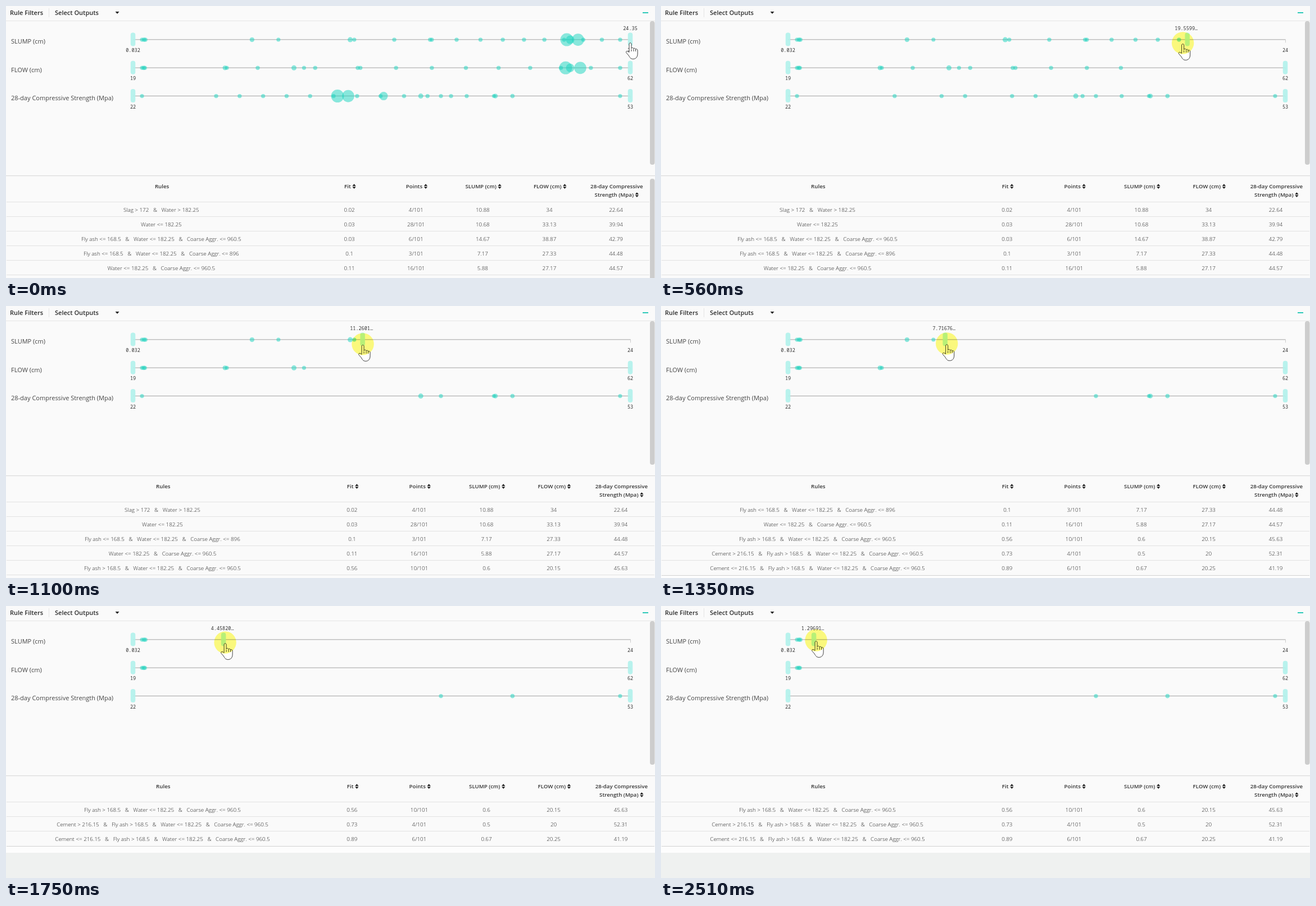
An HTML page with a canvas for the animation above (2690 ms loop, 1155x485 px).

```html
<!DOCTYPE html>
<html lang="en">
<head>
<meta charset="utf-8">
<title>Rule Filters</title>
<style>
html, body { margin: 0; width: 100%; height: 100%; overflow: hidden; background: #fafafa; }
canvas { display: block; }
</style>
</head>
<body>
<canvas id="stage" width="1155" height="485"></canvas>
<script>
const ctx = document.getElementById('stage').getContext('2d');
const W = 1155, H = 485, LOOP = 2690;
const X0 = 226, X1 = 1111, MIN = 0.032, MAX = 24.35;
const SANS = '"Open Sans", "Noto Sans", sans-serif';
const LABEL = '11px ' + SANS;
const TITLE = '600 11px ' + SANS;
const HEAD = '600 9.7px ' + SANS;
const CELL = '300 9.8px ' + SANS;
const MONO = '8.5px "Noto Sans Mono", "DejaVu Sans Mono", monospace';

// Key poses of the drag; a smooth curve runs through them.
const poses = [
  { step: 0, value: 24.35, dx: 0, y: 64 },
  { step: 4, value: 21.2859, dx: -9, y: 65 },
  { step: 7, value: 15.2065, dx: -3, y: 68 },
  { step: 11, value: 7.71676, dx: 3, y: 67 },
  { step: 14, value: 4.4582, dx: 3, y: 65 },
  { step: 17, value: 2.36688, dx: 4, y: 61 },
  { step: 20, value: 1.29691, dx: 4, y: 61 },
];

const FLY = 'Fly ash <= 168.5', FLY_HI = 'Fly ash > 168.5';
const WATER = 'Water <= 182.25', COARSE = 'Coarse Aggr. <= 960.5';
const tableRules = [
  [['Slag > 172', 'Water > 182.25'], 0.02, 4, 10.88, 34, 22.64],
  [[WATER], 0.03, 28, 10.68, 33.13, 39.94],
  [[FLY, WATER, COARSE], 0.03, 6, 14.67, 38.87, 42.79],
  [[FLY, WATER, 'Coarse Aggr. <= 896'], 0.1, 3, 7.17, 27.33, 44.48],
  [[WATER, COARSE], 0.11, 16, 5.88, 27.17, 44.57],
  [[FLY_HI, WATER, COARSE], 0.56, 10, 0.6, 20.15, 45.63],
  [['Cement > 216.15', FLY_HI, WATER, COARSE], 0.73, 4, 0.5, 20, 52.31],
  [['Cement <= 216.15', FLY_HI, WATER, COARSE], 0.89, 6, 0.67, 20.25, 41.19],
].map(([terms, fit, points, slump, flow, strength]) => ({
  cells: [terms.join('   &   '), fit, points + '/101', slump, flow, strength],
  xs: [242 + (slump - 0.5) * 36.4, 242 + (flow - 20) * 20.6, 242 + (strength - 22.64) * 28.68],
  r: 3.4 + points / 25,
}));
// Rules below the visible rows: slump and flow rise together, strength is scattered.
const lowerRules = Array.from({ length: 11 }, (_, i) => {
  const rise = (i / 10) ** 0.8;
  return { xs: [691 + 402 * rise, 448 + 645 * rise, 374 + 41.8 * ((7 + 8 * i) % 11)], r: 3.7 };
});
const largeRules = [
  { xs: [998, 996, 590], r: 11.5 },
  { xs: [1004, 1004, 672], r: 7.5 },
  { xs: [1018, 1022, 609], r: 10.8 },
];
const rules = [...tableRules, ...lowerRules, ...largeRules];

const axes = [['SLUMP (cm)', '0.032', '24'], ['FLOW (cm)', '19', '62'],
  ['28-day Compressive Strength (Mpa)', '22', '53']];
const heads = ['Rules', 'Fit', 'Points', 'SLUMP (cm)', 'FLOW (cm)', 'Strength (Mpa)'];

function rect(x, y, w, h, color) {
  ctx.fillStyle = color;
  ctx.fillRect(x, y, w, h);
}
function pill(x, y, w, h, color) {
  ctx.fillStyle = color;
  ctx.beginPath();
  ctx.roundRect(x, y, w, h, 4);
  ctx.fill();
}
function disc(x, y, r, color) {
  ctx.fillStyle = color;
  ctx.beginPath();
  ctx.arc(x, y, r, 0, Math.PI * 2);
  ctx.fill();
}
function triangle(x, base, w, h) {
  ctx.fillStyle = '#222';
  ctx.beginPath();
  ctx.moveTo(x - w / 2, base);
  ctx.lineTo(x + w / 2, base);
  ctx.lineTo(x, base + h);
  ctx.fill();
}
function text(str, x, y, font, color, align = 'center') {
  ctx.font = font;
  ctx.fillStyle = color;
  ctx.textAlign = align;
  ctx.fillText(str, x, y);
}

function stepAt(time) {
  return time < 560 ? Math.floor((time + 40) / 120) : 5 + Math.floor((time - 560) / 130);
}

function slope(i, prop) {
  const a = poses[i - 1], b = poses[i + 1];
  return a && b ? (b[prop] - a[prop]) / (b.step - a.step) : 0;
}
function poseAt(step, prop) {
  const i = Math.max(1, poses.findIndex(p => p.step >= step));
  const a = poses[i - 1], b = poses[i];
  const span = b.step - a.step, u = (step - a.step) / span, v = 1 - u;
  return a[prop] * v * v * (1 + 2 * u) + b[prop] * u * u * (1 + 2 * v)
    + span * u * v * (slope(i - 1, prop) * v - slope(i, prop) * u);
}

function drawToolbar() {
  text('Rule Filters', 7, 16, TITLE, '#2b2b2b', 'left');
  text('Select Outputs', 87, 16, TITLE, '#2b2b2b', 'left');
  rect(76, 4, 1, 16, '#e4e4e4');
  triangle(198, 10, 7, 4);
  rect(1133, 11, 10, 2, '#2cc9b8');
  rect(0, 26, W, 1, '#e6e6e6');
}

function drawAxis([name, low, high], i, handleX, shown) {
  const y = 59.4 + i * 50.25;
  text(name, 9, Math.round(y + 8), LABEL, '#444', 'left');
  rect(X0, y, X1 - X0, 1, '#a3a3a3');
  rect(X1, y, 1, 6, '#ccc');
  text(low, X0, y + 22.6, MONO, '#333');
  text(high, X1, y + 22.6, MONO, '#333');
  for (const rule of shown) disc(rule.xs[i], y + 0.7, rule.r, 'rgba(22,212,190,.5)');
  for (const x of [X0, i ? X1 : handleX]) pill(x - 4.25, y - 12, 8.5, 24, 'rgba(178,241,235,.92)');
}

function drawHead(label, x, y) {
  ctx.font = HEAD;
  const width = ctx.measureText(label).width;
  const left = x - (width + 9) / 2, iconX = left + width + 5.8;
  text(label, left, y, HEAD, '#333', 'left');
  triangle(iconX, y - 4, 6.4, -3.7);
  triangle(iconX, y - 2.8, 6.4, 3.7);
}

function drawTable(shown) {
  const scrolls = shown.length > 15;
  const width = scrolls ? 1145 : 1154;
  const center = i => (i ? 492.5 + 118.6 * i : 276.3) * width / 1145;
  rect(0, 302, W, 1, '#dcdcdc');
  rect(0, 303, W, 1, '#f2f2f2');

  heads.forEach((label, i) => {
    const x = center(i) + 1.3;
    if (i) drawHead(label, x, i === 5 ? 340 : 325);
    else text(label, x, 325, HEAD, '#333');
  });
  text('28-day Compressive', center(5) + 1.3, 325, HEAD, '#333');
  rect(1, 349, width - 1, 1, '#e2e2e2');

  shown.slice(0, 5).forEach((rule, row) => {
    const y = 349 + row * 26;
    rule.cells.forEach((cell, i) => text(cell, center(i), y + 17.5, CELL, '#222'));
    if (row < shown.length - 1) rect(1, y + 26, width - 1, 1, '#e2e2e2');
  });

  const bottom = 350 + shown.length * 26;
  rect(1, bottom, width - 1, 1, '#d2d2d2');
  rect(0, bottom + 1, W, H, '#fdfdfd');
  rect(0, bottom + 12, W, H, '#eff1f0');
  if (scrolls) pill(1146, 308, 8.5, 200, '#cdcdcd');
}

function drawHand(x, y) {
  ctx.save();
  ctx.translate(x, y + 1);
  ctx.beginPath();
  ctx.moveTo(-2, 17);
  ctx.lineTo(-2, 3);
  ctx.bezierCurveTo(-2, 0, 2, 0, 2, 3);
  ctx.lineTo(2, 11);
  ctx.bezierCurveTo(2.5, 8.5, 6, 9, 6, 11.5);
  ctx.bezierCurveTo(6.5, 9.5, 9.5, 10, 9.5, 12.5);
  ctx.bezierCurveTo(10, 11, 13, 11.5, 13, 14);
  ctx.lineTo(13, 20);
  ctx.bezierCurveTo(13, 26, 10, 29.5, 5, 29.5);
  ctx.bezierCurveTo(0, 29.5, -1, 26, -3, 23);
  ctx.lineTo(-7, 18.5);
  ctx.bezierCurveTo(-8.5, 15.5, -5.5, 14, -2, 17.5);
  ctx.closePath();
  for (const fold of [2, 6, 9.5]) {
    ctx.moveTo(fold, 12);
    ctx.lineTo(fold, 16);
  }
  ctx.fillStyle = '#fff';
  ctx.fill();
  ctx.strokeStyle = '#2a2a2a';
  ctx.lineWidth = 0.9;
  ctx.lineJoin = 'round';
  ctx.stroke();
  ctx.restore();
}

function drawPointer(step, handleX) {
  const x = handleX + poseAt(step, 'dx'), y = poseAt(step, 'y');
  drawHand(x, y);
  if (!step) return;
  ctx.globalCompositeOperation = 'multiply';
  disc(x, y, 19.7, '#fffd80');
  ctx.globalCompositeOperation = 'source-over';
}

function draw(time) {
  const step = stepAt(time);
  const value = poseAt(step, 'value');
  const handleX = X0 + (value - MIN) / (MAX - MIN) * (X1 - X0);
  const shown = rules.filter(rule => rule.xs[0] <= handleX);

  rect(0, 0, W, H, '#fafafa');
  drawToolbar();
  axes.forEach((axis, i) => drawAxis(axis, i, handleX, shown));
  const label = step ? value.toFixed(6).slice(0, 7) + '…' : '24.35';
  text(label, handleX - (step ? 2 : 0), 42.5, MONO, '#333');
  pill(1146, 27, 8.5, 256, '#cdcdcd');
  drawTable(shown);
  drawPointer(step, handleX);
}

function tick() {
  draw(performance.now() % LOOP);
  requestAnimationFrame(tick);
}
tick();
</script>
</body>
</html>
```
